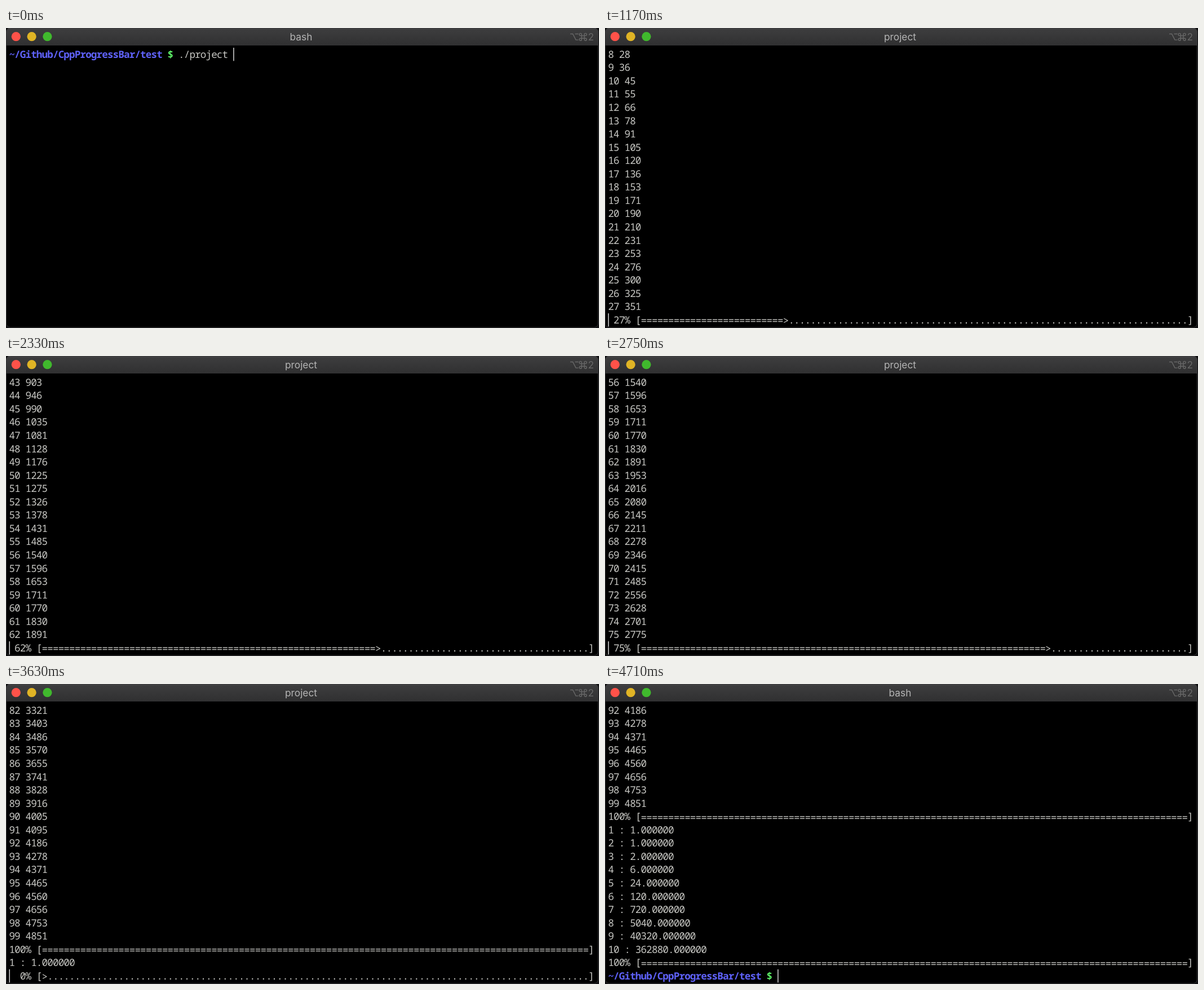
Write an HTML page that moves like this. It is 1052 px wide and 532 px high and loops after 4750 ms.

```html
<!DOCTYPE html>
<html lang="en">
<head>
<meta charset="utf-8">
<title>Terminal progress bar</title>
<style>
html, body { margin: 0; width: 100%; height: 100%; overflow: hidden; background: #101012; }
svg { display: block; }
.row { font: 350 17.6px "Noto Sans Mono", "DejaVu Sans Mono", monospace; letter-spacing: -0.86px;
  white-space: pre; font-variant-ligatures: none; text-rendering: geometricPrecision; fill: #c8c8c4; }
.path { fill: #5f62fa; font-weight: 700; }
.sign { fill: #60f96b; font-weight: 700; }
.title { font: 400 17.3px Inter, Roboto, sans-serif; fill: #b5b5b5; }
.keys { fill: none; stroke: #686868; stroke-width: 1.4; }
</style>
</head>
<body>
<svg width="1052" height="532" viewBox="0 0 1052 532">
  <defs>
    <linearGradient id="bar" x2="0" y2="1">
      <stop offset="0" stop-color="#3e3e3f"/>
      <stop offset="1" stop-color="#303031"/>
    </linearGradient>
    <clipPath id="win"><rect width="1051" height="531.5" rx="7"/></clipPath>
  </defs>
  <g clip-path="url(#win)">
    <rect width="1052" height="532"/>
    <rect width="1052" height="31" fill="url(#bar)"/>
    <rect width="1052" height="1.2" fill="#69696b"/>
  </g>
  <rect x=".5" y=".5" width="1050" height="530.5" rx="7" fill="none" stroke="#363638"/>
  <circle cx="17.8" cy="15.2" r="8.1" fill="#ff5249"/>
  <circle cx="45.6" cy="15.2" r="8.1" fill="#e0b425"/>
  <circle cx="73.4" cy="15.2" r="8.1" fill="#40b92d"/>
  <text id="title" class="title" x="523.5" y="22" text-anchor="middle"></text>
  <g class="keys">
    <path d="M1001 10.5h4.5l5.5 10.6h4.5M1009.5 10.5h6"/>
    <path d="M1021.3 13.6h4.6v4.6h-4.6zm0 0h-2.1a2.1 2.1 0 1 1 2.1-2.1zm4.6 0v-2.1a2.1 2.1 0 1 1 2.1 2.1zm0 4.6h2.1a2.1 2.1 0 1 1-2.1 2.1zm-4.6 0v2.1a2.1 2.1 0 1 1-2.1-2.1z"/>
  </g>
  <text class="title" x="1032.5" y="22" style="fill:#686868">2</text>
  <g id="rows"></g>
  <rect id="cursor" width="1.6" height="23.4" fill="#c9c9c9"/>
</svg>
<script>
const LOOP = 4750, ROWS = 21, CELL = 9.7, LINE = 23.55, LEFT = 5.4;
const ENTER = 230, START = 280;
const SUM_STEP = 32.9, FACT_STEP = 103;
const FACT_START = START + 100 * SUM_STEP;
const END = FACT_START + 10 * FACT_STEP;
const PROMPT = '<tspan class="path">~/Github/CppProgressBar/test</tspan> <tspan class="sign">$</tspan> ';

const $ = id => document.getElementById(id);
const rows = Array.from({ length: ROWS }, (_, i) => {
  const row = document.createElementNS('http://www.w3.org/2000/svg', 'text');
  row.setAttribute('class', 'row');
  row.setAttribute('x', LEFT);
  row.setAttribute('y', 52.8 + i * LINE);
  return $('rows').appendChild(row);
});

// The filled part sits slightly below the middle of the digits.
function progress(p) {
  const fill = p === 100 ? '='.repeat(100) : '='.repeat(Math.max(0, p - 1)) + '&gt;';
  const rest = '.'.repeat(100 - Math.max(1, p)) + ']';
  return `${String(p).padStart(3)}% [<tspan dy="1.4">${fill}</tspan><tspan dy="-1.4">${rest}</tspan>`;
}

// Appends the lines printed so far by one counting loop, then its bar.
function runLoop(lines, elapsed, step, count, print) {
  const done = Math.floor(elapsed / step);
  for (let i = 0; i <= Math.min(done, count - 1); i++) lines.push(print(i));
  lines.push(progress(Math.min(done, count) * 100 / count));
}

function factorial(n) {
  return n < 2 ? 1 : n * factorial(n - 1);
}

function screenAt(t) {
  const lines = [PROMPT + './project '];
  let col = 0;
  if (t < ENTER) col = 41;
  else if (t < START) lines.push('');
  else {
    runLoop(lines, t - START, SUM_STEP, 100, i => i + ' ' + i * (i - 1) / 2);
    if (t >= FACT_START) {
      runLoop(lines, t - FACT_START, FACT_STEP, 10, i => i + 1 + ' : ' + factorial(i).toFixed(6));
    }
    if (t >= END) {
      lines.push(PROMPT);
      col = 31;
    }
  }
  return { lines: lines.slice(-ROWS), col };
}

function draw(t) {
  const { lines, col } = screenAt(t);
  rows.forEach((row, i) => {
    const text = lines[i] || '';
    if (row.shown !== text) row.innerHTML = row.shown = text;
  });
  $('cursor').setAttribute('x', LEFT + col * CELL);
  $('cursor').setAttribute('y', 35 + (lines.length - 1) * LINE);
  $('title').textContent = t >= START && t < END ? 'project' : 'bash';
}

const begin = performance.now();
function tick() {
  draw((performance.now() - begin) % LOOP);
  requestAnimationFrame(tick);
}
tick();
</script>
</body>
</html>
```
